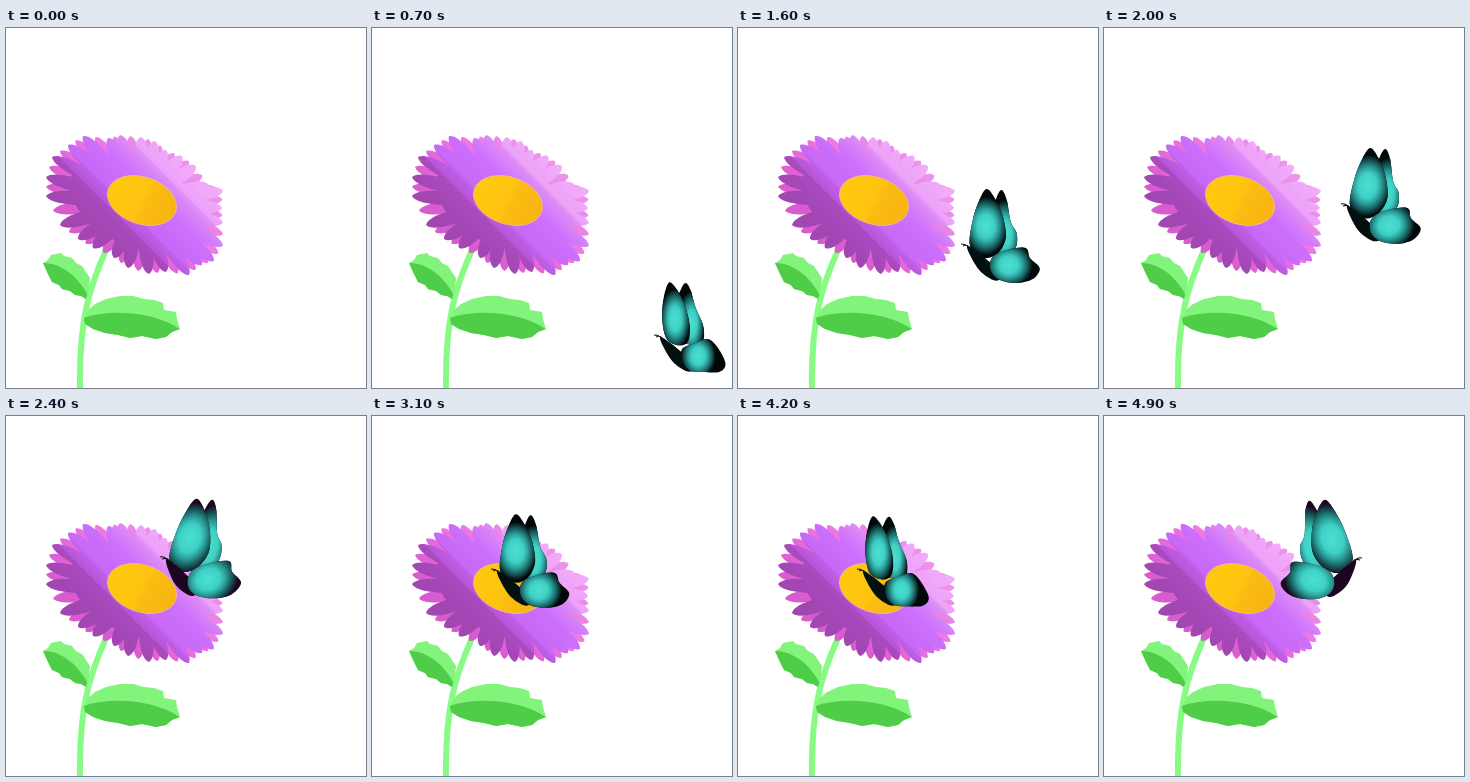
An HTML page with a canvas for the animation above (5000 ms loop, 360x360 px).

```html
<!DOCTYPE html>
<html lang="en">
<head>
<meta charset="utf-8">
<title>Flower and butterfly</title>
<style>
html, body { margin: 0; width: 100%; height: 100%; overflow: hidden; background: #fff; }
canvas { display: block; }
</style>
</head>
<body>
<canvas id="stage" width="360" height="360"></canvas>
<script>
const ctx = document.getElementById('stage').getContext('2d');
const LOOP = 5000, STEP = 100, TURN = 4500;
const mix = (a, b, k) => a + (b - a) * k;

function gradient(g, stops) {
  for (const [at, color] of stops) g.addColorStop(at, color);
  return g;
}

// Closed Catmull-Rom curve through a flat list of coordinates
function blob(c, p) {
  const n = p.length / 2;
  const at = i => { const j = (i + n) % n * 2; return [p[j], p[j + 1]]; };
  c.beginPath();
  c.moveTo(p[0], p[1]);
  for (let i = 0; i < n; i++) {
    const [a, b, d, e] = [at(i - 1), at(i), at(i + 1), at(i + 2)];
    c.bezierCurveTo(b[0] + (d[0] - a[0]) / 6, b[1] + (d[1] - a[1]) / 6,
      d[0] - (e[0] - b[0]) / 6, d[1] - (e[1] - b[1]) / 6, d[0], d[1]);
  }
  c.closePath();
}

function polygon(c, p) {
  c.beginPath();
  for (let i = 0; i < p.length; i += 2) c.lineTo(p[i], p[i + 1]);
  c.closePath();
}

// Flower
const HEART = [134, 174];
const TIPS = [
  46,129, 62,117, 77,108, 102,110, 114,107, 135,109, 149,113, 160,122, 176,128,
  190,138, 203,157, 217,163, 216,180, 217,195, 217,218, 208,233, 196,237, 183,247,
  160,244, 143,246, 122,240, 108,230, 87,220, 72,211, 54,197, 40,168, 40,149
];

function petal(c, x, y, half) {
  const [hx, hy] = HEART;
  const dx = x - hx, dy = y - hy, len = Math.hypot(dx, dy);
  const nx = -dy / len * half, ny = dx / len * half;
  c.beginPath();
  c.moveTo(hx, hy);
  c.bezierCurveTo(hx + dx * .5 + nx, hy + dy * .5 + ny, hx + dx * .93 + nx * 1.3, hy + dy * .93 + ny * 1.3, x, y);
  c.bezierCurveTo(hx + dx * .93 - nx * 1.3, hy + dy * .93 - ny * 1.3, hx + dx * .5 - nx, hy + dy * .5 - ny, hx, hy);
  c.fill();
}

function drawLeaf(c, outline, shade) {
  c.save();
  polygon(c, outline);
  c.fillStyle = '#82f47c';
  c.fill();
  c.clip();
  c.fillStyle = '#4fcc48';
  c.beginPath();
  c.moveTo(shade[0], shade[1]);
  c.bezierCurveTo(...shade.slice(2));
  c.lineTo(shade[6], 330);
  c.lineTo(shade[0], 330);
  c.fill();
  c.restore();
}

function drawFlower(c) {
  c.strokeStyle = '#88fb84';
  c.lineWidth = 6;
  c.beginPath();
  c.moveTo(100, 222);
  c.bezierCurveTo(84, 258, 73, 290, 74, 360);
  c.stroke();

  drawLeaf(c, [37,235, 42,232, 45,227, 55,225, 58,228, 66,230, 70,235, 76,238,
    80,244, 84,250, 83,261, 80,271, 75,268, 69,267, 64,263, 56,261, 53,257, 46,254, 42,246],
    [37,235, 55,235, 72,248, 82,268]);
  drawLeaf(c, [78,291, 82,282, 89,276, 100,271, 114,268, 127,268, 138,271, 148,272,
    157,275, 158,282, 170,284, 171,291, 174,301, 166,304, 160,309, 150,311, 136,308,
    124,310, 112,307, 99,305, 87,301, 79,296],
    [77,290, 105,281, 148,283, 175,302]);

  const span = [80, 193, 186, 87];
  const back = gradient(c.createLinearGradient(...span),
    [[0, '#d95bd0'], [.4, '#f074e0'], [.6, '#e988e8'], [1, '#f6a6f2']]);
  const front = gradient(c.createLinearGradient(...span), [
    [0, '#a246b2'], [.17, '#aa4abf'], [.18, '#b855d8'], [.25, '#bf5fe8'], [.26, '#c768f6'],
    [.44, '#cd70fd'], [.5, '#d37cfa'], [.58, '#de8df7'], [.6, '#eca2f8'], [1, '#fcbafc']]);
  const n = TIPS.length;
  c.fillStyle = back;
  for (let i = 0; i < n; i += 2) {
    petal(c, (TIPS[i] + TIPS[(i + 2) % n]) / 2, (TIPS[i + 1] + TIPS[(i + 3) % n]) / 2, 7);
  }
  c.fillStyle = front;
  for (let i = 0; i < n; i += 2) petal(c, TIPS[i], TIPS[i + 1], 8);
  c.beginPath();
  c.ellipse(130, 175, 70, 43, .44, 0, 7);
  c.fill();

  c.fillStyle = gradient(c.createLinearGradient(110, 158, 165, 186),
    [[0, '#ffc80e'], [.5, '#fec311'], [.55, '#fbbc12'], [1, '#f8b510']]);
  c.strokeStyle = '#f3b98c';
  c.lineWidth = 1;
  c.beginPath();
  c.ellipse(136, 172.5, 35.5, 23.5, .32, 0, 7);
  c.fill();
  c.stroke();
}

const flower = document.createElement('canvas');
flower.width = flower.height = 360;
drawFlower(flower.getContext('2d'));

// Butterfly: each wing has an open and a folded pose, glow = x, y, rx, ry
const WINGS = [
  { open: [24,0, 30,-30, 35,-47, 40,-54, 45,-44, 49,-22, 55,-10, 53,5, 38,10],
    shut: [20,0, 20,-30, 25,-45, 30,-52, 35,-45, 40,-28, 48,-8, 47,8, 36,10],
    glow: [43,-10, 17,34], fold: [36,-12, 13,32] },
  { open: [8,2, 11,-25, 18,-45, 25,-55, 33,-46, 41,-28, 44,-6, 36,9, 22,14],
    shut: [12,4, 7,-15, 8,-36, 13,-52, 20,-47, 29,-30, 34,-10, 33,6, 24,10],
    glow: [24,-18, 22,29], fold: [20,-16, 15,30] },
  { open: [30,14, 45,6, 64,4, 68,14, 78,24, 71,35, 55,39, 38,36, 29,27],
    shut: [27,14, 40,8, 52,4, 62,12, 70,29, 64,37, 48,37, 36,36, 28,28],
    glow: [47,21, 24,22], fold: [43,21, 17,22] }
];
const BODY = [5,2, 14,7, 24,15, 36,26, 38,35, 31,36, 18,27, 9,13];

// time, x, y of the antenna, lean
const PATH = [
  [0, 365, 378, 0], [700, 283, 307, 0], [1200, 240, 256, 0], [1600, 224, 216, 0],
  [1800, 233, 198, 0], [2000, 238, 176, .3], [2400, 155, 141, 1], [2800, 120, 153, 0],
  [4400, 120, 153, 0], [4500, 205, 158, 1], [4800, 242, 138, 1], [4900, 257, 142, 1]
];

function place(t) {
  let i = 1;
  while (i < PATH.length - 1 && PATH[i][0] < t) i++;
  const a = PATH[i - 1], b = PATH[i];
  const k = Math.min(1, (t - a[0]) / (b[0] - a[0]));
  return [1, 2, 3].map(j => mix(a[j], b[j], k));
}

function openness(t) {
  const beats = t < 3100 ? (t - 1620) / 380 : 3.9 + (t - 3100) / 440;
  return .5 + .5 * Math.cos(beats * 2 * Math.PI);
}

function drawWing(wing, k, lean) {
  const blend = (a, b) => a.map((v, i) => mix(v, b[i], k));
  const [x, y, rx, ry] = blend(wing.fold, wing.glow);
  const dark = lean > .5 ? '#1d0420' : '#020808';
  ctx.save();
  blob(ctx, blend(wing.shut, wing.open));
  ctx.fillStyle = dark;
  ctx.fill();
  ctx.clip();
  ctx.translate(x, y);
  ctx.scale(rx * (1 + .15 * lean), ry * (1 + .15 * lean));
  ctx.fillStyle = gradient(ctx.createRadialGradient(0, 0, 0, 0, 0, 1),
    [[0, '#4ae0d2'], [.4, '#3fd0c4'], [.6, '#2b9b96'], [.82, '#144f50'], [1, dark]]);
  ctx.beginPath();
  ctx.arc(0, 0, 1, 0, 7);
  ctx.fill();
  ctx.restore();
}

function drawButterfly(t) {
  const [x, y, lean] = place(t);
  const k = openness(t);
  ctx.save();
  ctx.translate(x, y);
  if (t >= TURN) ctx.scale(-1, 1);
  ctx.transform(1 + .08 * lean, 0, -.16 * lean, 1 + .06 * lean, 0, 0);
  drawWing(WINGS[0], k, lean);
  drawWing(WINGS[1], k, lean);
  blob(ctx, BODY);
  ctx.fillStyle = lean > .5 ? '#1d0420' : '#031010';
  ctx.fill();
  drawWing(WINGS[2], k, lean);
  ctx.strokeStyle = '#111';
  ctx.lineWidth = 1;
  ctx.beginPath();
  ctx.moveTo(7, 4);
  ctx.quadraticCurveTo(4, -1, -1, 0);
  ctx.moveTo(8, 4);
  ctx.quadraticCurveTo(6, 0, 1, 2);
  ctx.stroke();
  ctx.restore();
}

function frame(now) {
  const t = Math.floor(now % LOOP / STEP) * STEP;
  ctx.fillStyle = '#fff';
  ctx.fillRect(0, 0, 360, 360);
  ctx.drawImage(flower, 0, 0);
  if (t > 0) drawButterfly(t);
  requestAnimationFrame(() => frame(performance.now() - start));
}

const start = performance.now();
frame(0);
</script>
</body>
</html>
```
